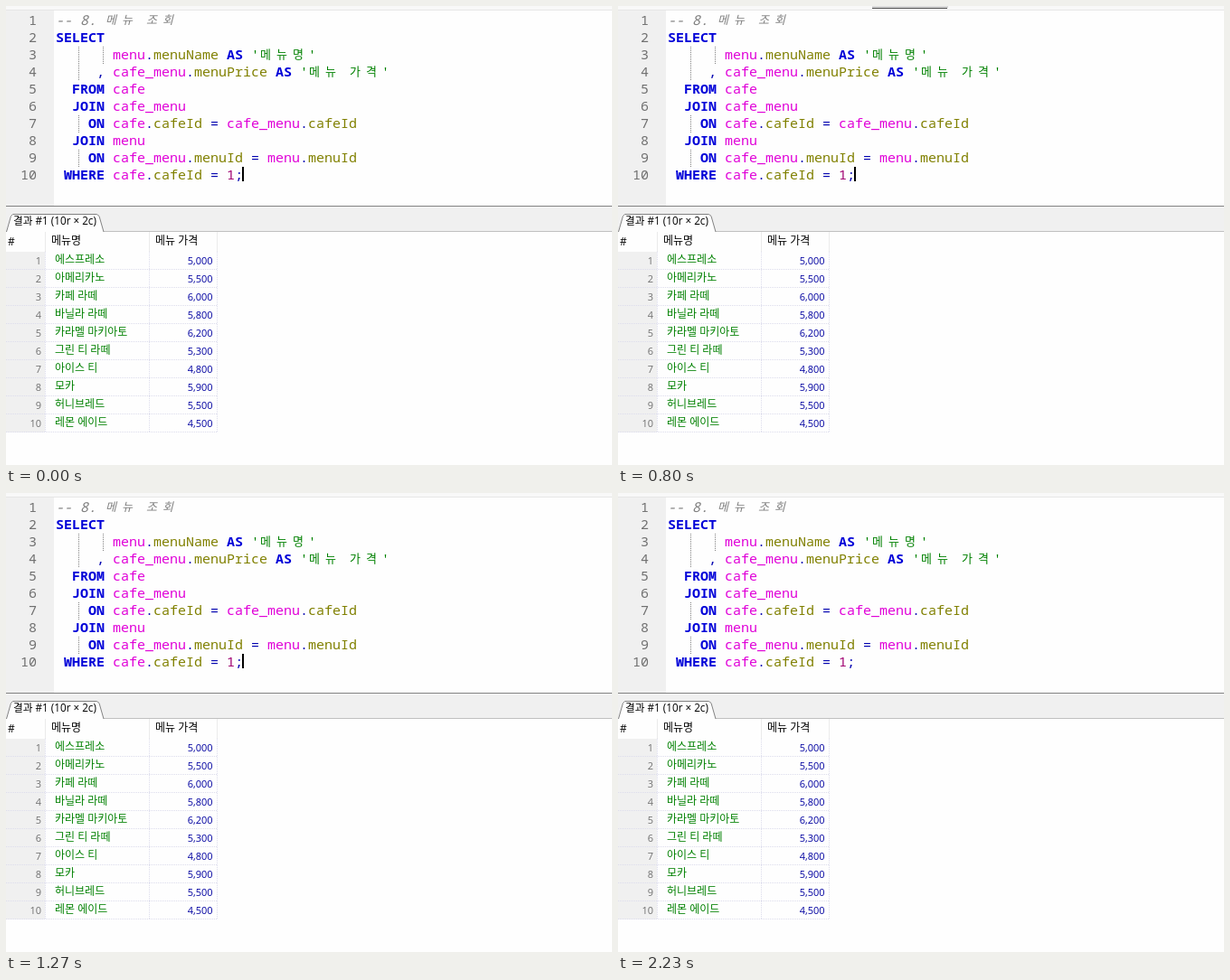
Write an HTML page with a canvas that moves like this. It is 670 px wide and 508 px high and loops after 2260 ms.

```html
<!DOCTYPE html>
<html lang="ko">
<head>
<meta charset="utf-8">
<style>
html, body { margin: 0; overflow: hidden; }
canvas { display: block; }
</style>
</head>
<body>
<canvas id="stage" width="670" height="508"></canvas>
<script>
const ctx = document.getElementById('stage').getContext('2d');
const LOOP = 2260;
const BLINK = 530;
const MONO = '15px "Noto Sans Mono", monospace';
const HANGUL = '13px "Noto Sans CJK KR", "Noto Sans CJK", sans-serif';
const UI = '"Open Sans", "Noto Sans CJK KR", "Noto Sans CJK", sans-serif';
const PAPER = '#fefefe', PANEL = '#f0f0f0', EMPTY = '#fafafa', EDGE = '#828282', GRID = '#dcdcec';

const sql = `-- 8. 메뉴 조회
SELECT
       menu.menuName AS '메뉴명'
     , cafe_menu.menuPrice AS '메뉴 가격'
  FROM cafe
  JOIN cafe_menu
    ON cafe.cafeId = cafe_menu.cafeId
  JOIN menu
    ON cafe_menu.menuId = menu.menuId
 WHERE cafe.cafeId = 1;`.split('\n');

const menu = [
  ['에스프레소', '5,000'], ['아메리카노', '5,500'], ['카페 라떼', '6,000'],
  ['바닐라 라떼', '5,800'], ['카라멜 마키아토', '6,200'], ['그린 티 라떼', '5,300'],
  ['아이스 티', '4,800'], ['모카', '5,900'], ['허니브레드', '5,500'], ['레몬 에이드', '4,500']
];

// First matching rule gives the token its colour and style.
const rules = [
  [/^--/, '#808080', 'italic '],
  [/^'/, '#008000', ''],
  [/^[A-Z]+$/, '#0000d8', 'bold '],
  [/^(cafe|menu|cafe_menu)$/, '#e000d8', ''],
  [/^[a-z]/i, '#808000', ''],
  [/^\d/, '#a00070', ''],
  [/./, '#0000b0', '']
];

function rect(x, y, w, h, color) {
  ctx.fillStyle = color;
  ctx.fillRect(x, y, w, h);
}

function text(str, x, y, color, font, align = 'left') {
  ctx.fillStyle = color;
  ctx.font = font;
  ctx.textAlign = align;
  ctx.fillText(str, x, y);
}

function dots(x, y, w, h, color) {
  const n = Math.max(w, h);
  for (let i = 0; i < n; i += 2) rect(w > h ? x + i : x, w > h ? y : y + i, 1, 1, color);
}

function codeLine(line, y) {
  let x = 55;
  for (const token of line.match(/--.*|'.*'|\w+|\s+|./g)) {
    const [, color, style] = rules.find(([pattern]) => pattern.test(token));
    for (const ch of token) {
      if (ch >= '가') {
        text(ch, x + 1, y - 1, color, style + HANGUL);
        x += 18;
      } else {
        text(ch, x, y, color, style + MONO);
        x += 9;
      }
    }
  }
}

function editor() {
  rect(0, 0, 670, 221, PAPER);
  rect(0, 0, 670, 5, '#f8f8f8');
  rect(0, 4, 670, 1, '#e6e6e6');
  rect(0, 5, 53, 216, PANEL);
  dots(80, 45, 1, 38, EDGE);
  dots(107, 45, 1, 19, EDGE);
  dots(80, 121, 1, 19, EDGE);
  dots(80, 159, 1, 19, EDGE);
  sql.forEach((line, i) => {
    const y = 21 + 19 * i;
    text(i + 1, 34, y, '#707070', MONO, 'right');
    codeLine(line, y);
  });
}

function tabBar() {
  rect(0, 221, 670, 29, PANEL);
  rect(0, 221, 670, 1, EDGE);
  rect(0, 249, 670, 1, '#c0c0c0');
  ctx.beginPath();
  ctx.moveTo(0.5, 250);
  ctx.lineTo(5.5, 232.5);
  ctx.lineTo(7.5, 230.5);
  ctx.lineTo(100.5, 230.5);
  ctx.lineTo(103, 232.5);
  ctx.lineTo(108, 250);
  ctx.fillStyle = PAPER;
  ctx.fill();
  ctx.strokeStyle = EDGE;
  ctx.stroke();
  text('결과 #1 (10r × 2c)', 8, 242, '#000', '11.7px ' + UI);
}

function results() {
  rect(0, 250, 670, 258, PAPER);
  rect(0, 272, 43, 200, PANEL);
  text('#', 2, 265, '#000', '12px ' + UI);
  text('메뉴명', 50, 264, '#000', '12px ' + UI);
  text('메뉴 가격', 165, 264, '#000', '12px ' + UI);
  for (const x of [43, 158, 233]) {
    rect(x, 250, 1, 22, '#ebebeb');
    dots(x, 272, 1, 200, GRID);
  }
  menu.forEach(([name, price], i) => {
    const y = 286 + 20 * i;
    text(i + 1, 39, y, '#707070', '11px ' + UI, 'right');
    text(name, 54, y - 1, '#008000', '12px ' + UI);
    text(price, 228.5, y, '#0000a0', '11px ' + UI, 'right');
    dots(0, y + 5, 234, 1, GRID);
  });
}

function draw(now) {
  const t = now % LOOP;
  const during = (from, to) => t >= from && t < to;

  editor();
  tabBar();
  if (during(930, 1000)) rect(0, 250, 670, 258, EMPTY);
  else results();

  // Running the query restarts the caret, so its second pause comes later.
  const caretHidden = during(150, 150 + BLINK) || during(1780, 1780 + BLINK);
  if (!caretHidden) rect(261, 178, 2, 16, '#000');

  // Lower edge of a hint hanging in from above.
  if (during(470, 900)) {
    rect(281, 0, 84, 2, '#d8d8d8');
    rect(281, 2, 83, 1, '#505050');
    if (t < 600) rect(274, 0, 91, 1, '#505050');
  }

  // Outline left behind while the results reload.
  if (during(1000, 1130)) {
    rect(0, 103, 193, 1, EDGE);
    rect(192, 5, 1, 98, '#d6d6d6');
  }
  requestAnimationFrame(draw);
}
requestAnimationFrame(draw);
</script>
</body>
</html>
```
